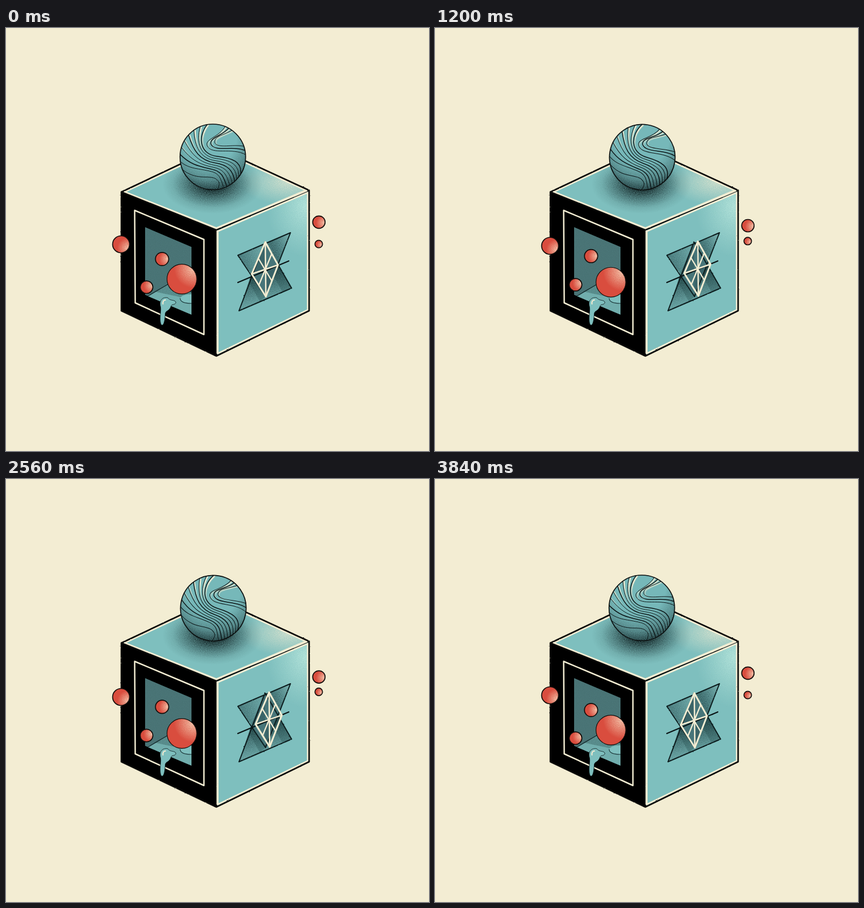
Recreate the animation shown at these times as an HTML page. Size 748 by 748 pixels, loop 3.92 s.

```html
<!DOCTYPE html>
<html lang="en">
<head>
<meta charset="utf-8">
<title>Cube</title>
<style>
html, body { margin: 0; width: 100%; height: 100%; overflow: hidden; background: #f3edd3; }
svg { display: block; width: 748px; height: 748px; }
</style>
</head>
<body>
<svg id="stage" viewBox="0 0 748 748" fill="none" stroke-linejoin="round" stroke-linecap="round">
  <defs>
    <filter id="grain" x="0" y="0" width="1" height="1" color-interpolation-filters="sRGB">
      <feTurbulence type="fractalNoise" baseFrequency=".9" numOctaves="1" seed="4"/>
      <feColorMatrix values="0 0 0 0 1  0 0 0 0 1  0 0 0 0 1  1 0 0 0 0" result="n"/>
      <feComposite in="SourceGraphic" in2="n" operator="arithmetic" k1="1.4" k2=".3"/>
    </filter>
    <filter id="rough" filterUnits="userSpaceOnUse" x="180" y="160" width="390" height="430" color-interpolation-filters="sRGB">
      <feTurbulence type="fractalNoise" baseFrequency=".4" numOctaves="2" seed="9"/>
      <feDisplacementMap in="SourceGraphic" scale="1.8" xChannelSelector="R" yChannelSelector="G"/>
    </filter>
    <radialGradient id="shadow">
      <stop offset=".2" stop-color="#071314" stop-opacity=".8"/>
      <stop offset=".55" stop-color="#0c2022" stop-opacity=".38"/>
      <stop offset=".8" stop-color="#0c2022" stop-opacity=".1"/>
      <stop offset="1" stop-color="#0c2022" stop-opacity="0"/>
    </radialGradient>
    <radialGradient id="glow">
      <stop offset="0" stop-color="#f3edd3" stop-opacity=".65"/>
      <stop offset="1" stop-color="#f3edd3" stop-opacity="0"/>
    </radialGradient>
    <radialGradient id="mint">
      <stop offset="0" stop-color="#c4eee2" stop-opacity=".7"/>
      <stop offset="1" stop-color="#b4e4da" stop-opacity="0"/>
    </radialGradient>
    <radialGradient id="orbShade" gradientUnits="userSpaceOnUse" cx="-6" cy="-34" r="96">
      <stop offset=".5" stop-color="#0b1c1e" stop-opacity="0"/>
      <stop offset=".78" stop-color="#0b1c1e" stop-opacity=".3"/>
      <stop offset="1" stop-color="#0b1c1e" stop-opacity=".8"/>
    </radialGradient>
    <linearGradient id="rim" gradientUnits="userSpaceOnUse" x1="-8" y1="-58" x2="4" y2="-12">
      <stop offset=".2" stop-color="#f3edd3" stop-opacity=".9"/>
      <stop offset="1" stop-color="#f3edd3" stop-opacity="0"/>
    </linearGradient>
    <linearGradient id="upper" gradientUnits="userSpaceOnUse" x1="414" y1="412" x2="500" y2="374">
      <stop offset="0" stop-color="#17383b" stop-opacity=".5"/>
      <stop offset=".45" stop-color="#17383b" stop-opacity=".2"/>
      <stop offset=".65" stop-color="#17383b" stop-opacity=".6"/>
      <stop offset="1" stop-color="#17383b" stop-opacity=".2"/>
    </linearGradient>
    <linearGradient id="lower" gradientUnits="userSpaceOnUse" x1="456" y1="430" x2="470" y2="482">
      <stop offset="0" stop-color="#0e2628" stop-opacity=".75"/>
      <stop offset="1" stop-color="#17383b" stop-opacity=".2"/>
    </linearGradient>
    <clipPath id="topClip"><path d="M204 290 371 211 536 287 372 357Z"/></clipPath>
    <clipPath id="sideClip"><path d="M372 357 536 287V500L372 580Z"/></clipPath>
    <clipPath id="holeClip"><path d="M246 352 328 387V507L246 472Z"/></clipPath>
    <clipPath id="orbClip"><circle r="58"/></clipPath>
  </defs>

  <rect width="748" height="748" fill="#f3edd3"/>

  <g clip-path="url(#topClip)">
    <path d="M204 290 371 211 536 287 372 357Z" fill="#7ebfbe"/>
    <ellipse cx="500" cy="272" rx="85" ry="42" fill="url(#glow)" filter="url(#grain)"/>
    <ellipse cx="365" cy="276" rx="88" ry="52" fill="url(#shadow)" filter="url(#grain)"/>
    <path d="M209 290 371 214 531 287 372 354Z" stroke="#f3edd3" stroke-width="3.4"/>
  </g>

  <g clip-path="url(#sideClip)">
    <path d="M372 357 536 287V500L372 580Z" fill="#7ebfbe"/>
    <ellipse cx="530" cy="315" rx="70" ry="90" fill="url(#mint)" filter="url(#grain)"/>
    <path d="M374.500 359.500 533.500 291V498.500L374.500 575.500Z" stroke="#f3edd3" stroke-width="2.800"/>
  </g>

  <path d="M204 290 372 357V580L204 500Z" fill="#000" filter="url(#rough)"/>
  <path d="M204 290 371 211 536 287V500L372 580 204 500ZM372 357 536 287M204 290 372 357V580" stroke="#0a0a09" stroke-width="2.7" filter="url(#rough)"/>
  <path d="M210 289.500 372 354.500 532 288" stroke="#f3edd3" stroke-width="2.2"/>
  <path d="M373.500 359V575" stroke="#f3edd3" stroke-width="2.4"/>
  <path d="M227.500 322.500 350 374V542L228.500 486Z" stroke="#f3edd3" stroke-width="2.5"/>

  <g clip-path="url(#holeClip)">
    <path d="M246 352 328 387V507L246 472Z" fill="#41696b"/>
    <path d="M246 352 328 387V507L246 472Z" fill="#83b8b5" fill-opacity=".14" filter="url(#grain)"/>
    <path d="M246 477 290 451 328 467V507Z" fill="#71aead"/>
    <path d="M246 477 290 451 328 467" stroke="#122628" stroke-width="1.2"/>
    <path d="M262 466 290 451 328 467V480Z" fill="#10282b" fill-opacity=".25" filter="url(#grain)"/>
    <path d="M328 471C314 470 305 476 308 482 311 487 321 486 328 488Z" fill="#7ebfbe"/>
    <path d="M308 478C308 486 319 487 328 487" stroke="#1b3638" stroke-width="1.2"/>
  </g>
  <path d="M272.500 490C271 481 278 475 286 477 289 481 293 481 297 482 303 484 300 489 295 489 291 490 292 494 289 497 286 501 282 500 281.500 506 281 514 280 525 276 525.500 272 525 272.500 513 273 506 273.500 500 274.500 495 272.500 490Z" fill="#7ebfbe" stroke="#0a1516" stroke-width=".8"/>
  <path d="M277.500 488C277 483 279 481 282 481" stroke="#f3edd3" stroke-width="2"/>

  <g id="motif">
    <path d="M410 402 503 362 481 419 434 435Z" fill="url(#upper)" filter="url(#grain)"/>
    <path d="M412 500 434 435 481 419 505 460Z" fill="url(#lower)" filter="url(#grain)"/>
    <path d="M430 449 449 484 459 475 434 435ZM473 438 489 467 505 460 481 419Z" fill="#17383b" fill-opacity=".25"/>
    <path d="M458 378 481 419 459 475 434 435Z" fill="#477579"/>
    <path d="M458 378V428L434 435ZM458 428 481 419 459 475Z" fill="#1b3d40" fill-opacity=".3"/>
    <path d="M410 402 503 362 459 475ZM412 500 505 460 458 378Z" stroke="#0d1d1e" stroke-width="2" filter="url(#rough)"/>
    <path d="M410 450 500 412" stroke="#0a1415" stroke-width="2.2"/>
  </g>
  <g id="gem" stroke="#f3edd3">
    <path d="M458.500 378.500 481 419 459.500 475 434.500 435Z" stroke-width="3"/>
    <path d="M458.500 378.500 459.500 475M434.500 435 481 419" stroke-width="2.5"/>
    <path d="M446 407 470 447M470 399 447 455" stroke-width="2.3"/>
  </g>

  <g id="orb">
    <circle r="58" fill="#76b8b9"/>
    <g id="waves" clip-path="url(#orbClip)"></g>
    <circle r="58" stroke="#0b0f0f" stroke-width="1.7"/>
  </g>
  <g id="balls"></g>
</svg>
<script>
const NS = 'http://www.w3.org/2000/svg';
const $ = id => document.getElementById(id);
const add = (parent, tag, attrs) => {
  const el = document.createElementNS(NS, tag);
  for (const k in attrs) el.setAttribute(k, attrs[k]);
  return parent.appendChild(el);
};
const mix = (a, b, u) => a + (b - a) * u;
const onRim = deg => [58 * Math.cos(deg * Math.PI / 180), 58 * Math.sin(deg * Math.PI / 180)];
const waves = $('waves');

// Bands that run down from the upper left rim, bend right and drop to the lower right.
const inner = [-28, -34, -22, -4, 8, -1, 34, 2, 52, 8];
const outer = [-42, 22, -24, 20, -2, 26, 14, 30, 14, 42];
const band = u => {
  const c = inner.map((v, i) => mix(v, outer[i], u));
  return 'M' + onRim(mix(260, 172, u)) + 'C' + c.slice(0, 6) + 'C' + c.slice(6) + ' ' + onRim(mix(32, 70, u));
};
// Nested hooks at the upper right.
const hook = u => {
  const x = mix(-10, 4, u), y = mix(-20, -24, u);
  return `M58 ${mix(-4, -18, u)}C${mix(34, 40, u)} ${mix(-18, -24, u)} ${x + 8} ${mix(-2, -14, u)} ${x} ${y}` +
    `C${x - 4} ${y - 12} ${mix(10, 18, u)} ${y - 14} ${mix(22, 34, u)} ${mix(-54, -47, u)}`;
};
const curves = [];
for (let i = 0; i < 8; i++) curves.push(band(i / 7));
for (let i = 0; i < 3; i++) curves.push(hook(i / 2));
curves.push('M-54 22C-30 42-8 32 4 38 14 44 12 50 8 58');

curves.forEach(d => add(waves, 'path', { d, stroke: 'url(#rim)', 'stroke-width': 2.6, transform: 'translate(2 1)' }));
add(waves, 'circle', { r: 58, fill: 'url(#orbShade)', filter: 'url(#grain)' });
curves.forEach((d, i) => add(waves, 'path', { d, stroke: '#0c1617', 'stroke-width': i % 3 ? 1 : 1.5 }));

// x, y, radius, vertical travel, light direction
const balls = [
  [203.5, 382.5, 15, 4, .6, .35],
  [276, 408.5, 11.7, -7.5, .6, 0],
  [248.5, 458.3, 11.2, -6.2, .6, -.2],
  [311, 444, 26.3, 8, .55, -.5],
  [553.3, 343.3, 11, 9, .6, .1],
  [553, 382, 6.7, -7.5, .5, .2]
].map(([x, y, r, dy, lx, ly], i) => {
  const g = add($('balls'), 'g', {});
  const grad = add(document.querySelector('defs'), 'radialGradient', {
    id: 'lit' + i, gradientUnits: 'userSpaceOnUse', cx: lx * r * 1.4, cy: ly * r * 1.4, r: r * 1.3
  });
  [[0, .8], [.35, .5], [1, 0]].forEach(([offset, alpha]) =>
    add(grad, 'stop', { offset, 'stop-color': '#f8dcc0', 'stop-opacity': alpha }));
  add(g, 'circle', { r, fill: '#d94d3e' });
  add(g, 'circle', { r, fill: `url(#lit${i})`, filter: 'url(#grain)' });
  add(g, 'circle', { r, stroke: '#120c0a', 'stroke-width': r > 20 ? 1.2 : 1.7 });
  return { g, x, y, dy };
});

const LOOP = 3920, STEP = 80, SWING = 48;
function draw(ms) {
  const k = Math.floor(ms % LOOP / STEP);
  const p = (1 - Math.cos(2 * Math.PI * k / SWING)) / 2;
  balls.forEach(b => b.g.setAttribute('transform', `translate(${b.x} ${b.y + b.dy * p})`));
  $('gem').setAttribute('transform', `translate(${9 * p} ${-1.8 * p})`);
  $('orb').setAttribute('transform', `translate(${365.7 + 1.2 * p} ${228 + .6 * p}) rotate(${14 * p})`);
}
const start = performance.now();
function tick() {
  draw(performance.now() - start);
  requestAnimationFrame(tick);
}
draw(0);
requestAnimationFrame(tick);
</script>
</body>
</html>
```
